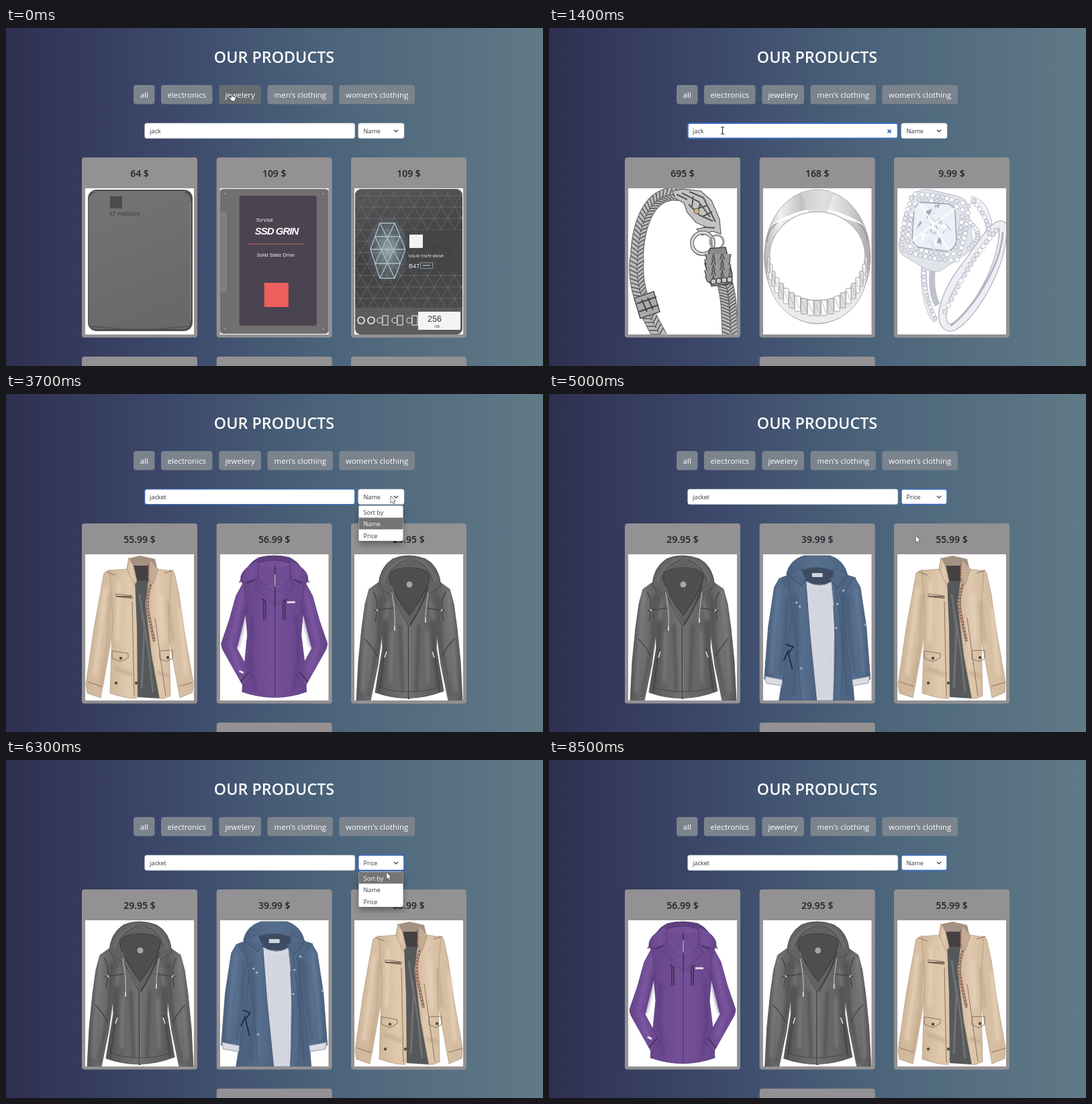
Write an HTML page that moves like this. It is 800 px wide and 504 px high and loops after 8800 ms.

```html
<!DOCTYPE html>
<html lang="en">
<head>
<meta charset="utf-8">
<title>Our products</title>
<style>
html, body { margin: 0; width: 100%; height: 100%; overflow: hidden; }
svg { display: block; width: 800px; height: 504px; font-family: "Open Sans", "Noto Sans", sans-serif; }
</style>
</head>
<body>
<svg id="stage" viewBox="0 0 800 504">
  <defs>
    <linearGradient id="sky"><stop stop-color="#2f3051"/><stop offset=".3" stop-color="#3c486a"/><stop offset=".6" stop-color="#4b647b"/><stop offset="1" stop-color="#607a87"/></linearGradient>
    <linearGradient id="steel" x2=".3" y2="1"><stop stop-color="#747476"/><stop offset="1" stop-color="#69696b"/></linearGradient>
    <linearGradient id="night" x2=".2" y2="1"><stop stop-color="#58585a"/><stop offset=".5" stop-color="#424244"/><stop offset="1" stop-color="#4b4b4d"/></linearGradient>
    <linearGradient id="silver"><stop stop-color="#b5b5b5"/><stop offset=".15" stop-color="#f2f2f2"/><stop offset=".35" stop-color="#c2c2c2"/><stop offset=".55" stop-color="#f6f6f6"/><stop offset=".8" stop-color="#cfcfcf"/><stop offset="1" stop-color="#aaa"/></linearGradient>
    <linearGradient id="cotton"><stop stop-color="#cfb699"/><stop offset=".45" stop-color="#e0c9ae"/><stop offset="1" stop-color="#d3bb9f"/></linearGradient>
    <linearGradient id="violet"><stop stop-color="#674589"/><stop offset=".5" stop-color="#75509a"/><stop offset="1" stop-color="#684689"/></linearGradient>
    <linearGradient id="leather"><stop stop-color="#565658"/><stop offset=".45" stop-color="#727274"/><stop offset="1" stop-color="#5a5a5c"/></linearGradient>
    <linearGradient id="denim"><stop stop-color="#4b6080"/><stop offset=".5" stop-color="#576f8e"/><stop offset="1" stop-color="#4d6382"/></linearGradient>
    <radialGradient id="glow"><stop stop-color="#b9cbd3" stop-opacity=".75"/><stop offset="1" stop-color="#7390a0" stop-opacity="0"/></radialGradient>
    <clipPath id="photo"><rect width="162" height="218"/></clipPath>
    <clipPath id="body"><rect x="1" y="1" width="160" height="217" rx="9"/></clipPath>
    <clipPath id="cardClip"><rect x="514" y="193" width="172" height="268.5" rx="4"/></clipPath>
    <filter id="shadow" x="-40%" y="-40%" width="180%" height="190%"><feDropShadow dx="0" dy="5" stdDeviation="5" flood-opacity=".35"/></filter>
    <filter id="soft" filterUnits="userSpaceOnUse" x="-10" y="-10" width="182" height="238"><feGaussianBlur stdDeviation="2"/></filter>
  </defs>
  <rect width="800" height="504" fill="url(#sky)"/>
  <text x="399.5" y="52" font-size="23.3" font-weight="600" fill="#fff" text-anchor="middle">OUR PRODUCTS</text>
  <g id="buttons"></g>
  <g id="cards"></g>
  <g clip-path="url(#cardClip)"><g id="overlay">
    <path d="M519 70V6q0-6 6-6h150q6 0 6 6v64z" fill="#939193"/>
    <text x="600" y="34" font-size="11.4" font-weight="600" fill="#fff" text-anchor="middle">Mens Cotton Jacket</text>
  </g></g>
  <g id="form"></g>
  <g id="cursor"></g>
</svg>
<script>
const LOOP = 8800, STEP = 100;
const $ = id => document.getElementById(id);
const range = n => [...Array(n).keys()];
const rect = (x, y, w, h, fill, extra = "") => `<rect x="${x}" y="${y}" width="${w}" height="${h}" fill="${fill}" ${extra}/>`;
const path = (d, fill = "none", stroke = "none", width = 1, extra = "") =>
  `<path d="${d}" fill="${fill}" stroke="${stroke}" stroke-width="${width}" ${extra}/>`;
const dot = (x, y, r, fill, extra = "") => `<circle cx="${x}" cy="${y}" r="${r}" fill="${fill}" ${extra}/>`;
const oval = (x, y, rx, ry, fill, extra = "") => `<ellipse cx="${x}" cy="${y}" rx="${rx}" ry="${ry}" fill="${fill}" ${extra}/>`;
const text = (x, y, size, fill, str, extra = "") => `<text x="${x}" y="${y}" font-size="${size}" fill="${fill}" ${extra}>${str}</text>`;
const fold = (d, color, width = 5) => path(d, "none", color, width, 'filter="url(#soft)" opacity=".65"');
const bold = 'font-weight="600"', middle = 'text-anchor="middle"', arial = 'font-family="Liberation Sans, sans-serif"';
const mirrored = (art, axis) => art + `<g transform="translate(${axis * 2}) scale(-1 1)">${art}</g>`;

function random(seed) {
  return () => (seed = (seed * 16807) % 2147483647) / 2147483647;
}

// Rope of chevrons along a cubic curve
function braid(a, b, c, d, width, count) {
  const curve = `M${a}C${b} ${c} ${d}`;
  const at = t => [0, 1].map(i => (1 - t) ** 3 * a[i] + 3 * t * (1 - t) ** 2 * b[i] + 3 * t * t * (1 - t) * c[i] + t ** 3 * d[i]);
  const links = range(count).map(i => {
    const [x, y] = at(i / count), [nx, ny] = at((i + 1) / count);
    const angle = Math.atan2(ny - y, nx - x) * 180 / Math.PI, h = width / 2 - 1;
    return `<path transform="translate(${x.toFixed(1)} ${y.toFixed(1)}) rotate(${angle.toFixed(1)})" d="M-3 ${-h}L3 -1L-3 ${h}M3 -1H6"/>`;
  }).join("");
  return path(curve, "none", "#6e6e6e", width) + path(curve, "none", "#bdbdbd", width - 2.5) +
    `<g fill="none" stroke="#5c5c5c" stroke-width="1.7">${links}</g>`;
}

function gems(count, place, seed) {
  const rnd = random(seed);
  return range(count).map(i => {
    const [x, y, r] = place(i / (count - 1));
    return dot(x.toFixed(1), y.toFixed(1), r, rnd() > .5 ? "#fff" : "#e3e5ec", 'stroke="#a9adba" stroke-width=".8"');
  }).join("");
}

function drive() {
  return rect(4, 2, 156, 211, "#4f4f51", 'rx="13"') + rect(5, 6, 152, 204, "url(#steel)", 'rx="12"') +
    path("M10 5H150M157 20V195", "none", "#8d8d8f", 1) + path("M10 206Q80 214 152 206", "none", "#555557", 2) +
    rect(37, 12, 18, 18, "#4b4b4d") + text(36, 41, 8, "#48484a", "KT Pebblers", bold);
}

function ssd() {
  const screws = [[8, 8], [154, 8], [8, 210], [154, 210]].map(([x, y]) => dot(x, y, 3, "#858385", 'stroke="#5d5b5d"')).join("");
  return rect(0, 1, 162, 216, "#716f71", 'rx="5"') + path("M1 33H9Q12 33 12 37V152Q12 157 8 157H1", "#7f7d7f", "#605e60") + screws +
    rect(29, 11, 115, 194, "#4a4450", 'rx="3"') +
    text(53, 50, 8, "#eee", "TorVisk", `${arial} font-style="italic"`) +
    text(52, 69, 15, "#fff", "SSD GRIN", `${arial} font-weight="700" font-style="italic" letter-spacing="-1"`) +
    path("M42 83H126", "none", "#d9706c", 1.4, 'stroke-dasharray="1.4 1"') +
    text(83, 102, 7.6, "#eee", "Solid State Drive", `${arial} ${middle}`) + rect(66, 141, 36, 36, "#ee5f5d");
}

function meshDrive() {
  const rows = range(12).map(i => `M0 ${i * 17 - 6}H162`).join("");
  const slants = range(26).map(i => `M${i * 20 - 170} -6l118 204M${i * 20 - 170} 198l118 -204`).join("");
  const star = "M38 52H60L76 91L60 134H38L24 91ZM31 72H68M24 91H76M31 112H68M38 52L68 112M60 52L31 112M31 72L60 134M68 72L38 134";
  const icons = range(6).map(i => i % 2 ? rect(31 + i * 11, 190, 8, 14, "none", 'stroke="#ddd" stroke-width="1.2"') : dot(38 + i * 11, 197, 4, "none", 'stroke="#ddd" stroke-width="1.2"')).join("");
  return `<g clip-path="url(#body)">` + rect(0, 0, 162, 218, "url(#night)") + path(rows + slants, "none", "#6f6f71", .8) +
    oval(50, 92, 33, 52, "url(#glow)") + path(star, "none", "#a9c0ca", 1.3) +
    rect(76, 62, 86, 62, "#444446", 'opacity=".75"') + rect(0, 178, 162, 40, "#5c5c5e") + "</g>" +
    rect(82, 69, 20, 20, "#f2f2f2") +
    text(81, 103, 5, "#eee", "SOLID STATE DRIVE", `${bold} letter-spacing=".4"`) + text(81, 119, 9, "#eee", "B47", arial) +
    rect(98.5, 111, 18, 8.5, "none", 'stroke="#8097a1"') + rect(102, 114, 11, 2, "#8097a1") +
    dot(10, 197, 5, "none", 'stroke="#eee" stroke-width="1.7"') + dot(25, 197, 5, "none", 'stroke="#eee" stroke-width="1.7"') + icons +
    rect(95, 184, 63, 27, "#f4f4f4", 'rx="1"') + text(109, 199, 12.5, "#333", "256", arial) + text(119, 208, 5.5, "#444", "GB", arial);
}

function bracelet() {
  const scales = range(15).map(i => {
    const x = 121 + (i % 3) * 13 - (i % 2), y = 98 + Math.floor(i / 3) * 8;
    return path(`M${x - 6} ${y}q1 9 6 11q5 -2 6 -11`, "#999", "#4b4b4b", 1.4);
  }).join("");
  const head = "M66 4L82 1L108 4L124 18L136 46L138 68L125 64L110 70L102 61L116 58L101 51L88 36L83 22L70 15Z";
  return braid([76, 9], [30, 2], [14, 58], [13, 104], 20, 22) + braid([13, 104], [8, 150], [25, 180], [48, 222], 22, 20) +
    path("M9 164L38 154L47 184L18 194Z", "#aaa", "#4d4d4d", 1.5) + path("M13 172L42 162M16 184L45 174M20 166l8 18M29 163l8 18", "none", "#444", 2) +
    path(head, "#c4c4c4", "#666", 1.3) +
    path("M80 7L105 20L122 43M91 5L112 14L130 50M90 24L106 40L126 49M104 30l13-4M111 42l14-7M112 58l17 1M72 9l16 8M97 12l-2 15M107 24l-4 14", "none", "#555", 2) +
    dot(102, 34, 4, "#d7b27c", 'stroke="#555"') +
    dot(111, 82, 16, "none", 'stroke="#777" stroke-width="6"') + dot(111, 82, 16, "none", 'stroke="#ddd" stroke-width="3"') +
    dot(132, 80, 10, "none", 'stroke="#999" stroke-width="3"') +
    braid([143, 138], [151, 164], [150, 188], [152, 222], 24, 17) +
    path("M122 90L145 88L155 128L154 142L124 146L114 112Z", "#8a8a8a", "#4a4a4a", 1.5) + scales +
    range(4).map(i => dot(127 + i * 8, 139 - i, 4, "#c9c9c9", 'stroke="#444" stroke-width="1.5"')).join("");
}

function band() {
  const stones = range(21).map(i => {
    const a = (12 + i * 7.8) * Math.PI / 180, x = 81 + 74 * Math.cos(a), y = 97 + 82 * Math.sin(a);
    const w = 3 + 6 * Math.sin(a), h = 23;
    return rect((x - w / 2).toFixed(1), (y - h / 2).toFixed(1), w.toFixed(1), h, i % 2 ? "#fafafa" : "#dedede", 'rx="1.5" stroke="#9c9c9c" stroke-width=".9"') +
      path(`M${x - w / 3} ${y - 8}L${x + w / 3} ${y + 7}`, "none", "#b4b4b4", .8);
  }).join("");
  return oval(81, 102, 79, 100, "url(#silver)", 'stroke="#a2a2a2"') + path("M6 80C8 18 154 18 156 80", "none", "#9c9c9c", 2) +
    path("M10 56Q82 6 152 56Q82 24 10 56Z", "#fff") + path("M57 5Q81 0 106 6L96 35H68Z", "#d4d4d4", "none", 0, 'opacity=".7"') +
    oval(81, 101, 71, 66, "#fff", 'stroke="#b6b6b6" stroke-width="1.4"') +
    path("M4 106C12 188 150 188 158 106L156 128C142 226 20 226 6 128Z", "#ececec", "#aaa") + stones;
}

function diamond() {
  const rnd = random(77), halo = (t, wide) => {
    const a = t * Math.PI * 2, k = 1 / Math.max(Math.abs(Math.cos(a)), Math.abs(Math.sin(a))) ** .75;
    return [56 + wide * k * Math.cos(a + .2), 58 + wide * k * Math.sin(a + .2), 3.4];
  };
  const facets = range(38).map(() => {
    const x = 30 + rnd() * 48, y = 24 + rnd() * 58;
    return path(`M${x} ${y}l${rnd() * 20 - 10} ${rnd() * 20 - 10}l${rnd() * 14 - 7} ${rnd() * 14}z`, ["#c8cfdf", "#fff", "#e1e6ef", "#9da6b8"][Math.floor(rnd() * 4)]);
  }).join("");
  const hoop = "M157 55C146 48 126 82 101 116C70 155 58 198 75 207C94 217 162 122 157 55Z";
  return path("M109 17C130 20 137 44 137 68", "none", "#b9bcc7", 10) + path("M109 17C130 20 137 44 137 68", "none", "#f3f3f7", 8) +
    path("M40 116C37 155 48 190 58 197M53 116C49 145 54 165 60 174", "none", "#bfc2cd", 9) + path("M40 116C37 155 48 190 58 197", "none", "#f0f0f5", 7) +
    path(hoop, "none", "#9fa3b0", 12) + path(hoop, "none", "#eeeef4", 10) +
    path("M157 65C155 118 107 186 79 205", "none", "#b3b6c2", 3) +
    gems(17, t => [147 - 76 * t, 63 + 121 * t - 10 * Math.sin(t * 3.14), 3.7], 9) +
    gems(14, t => [39 + 17 * t * t, 121 + 73 * t, 3], 12) + gems(9, t => [114 + 23 * Math.sin(t * 1.5), 19 + 48 * t, 3.3], 5) +
    path("M23 9Q33 0 48 2L91 12Q104 17 105 26L112 80Q111 91 101 99L62 124Q48 125 38 118L7 99Q0 90 3 78Z", "#e2e4eb", "#b7bac6") +
    gems(42, t => halo(t, 46), 21) + gems(34, t => halo(t, 38), 31) +
    path("M32 21L75 23Q85 27 86 35L88 79Q85 91 75 94L32 88Q23 84 22 75L25 30Z", "#edf0f6", "#989faf", 1.4) + facets +
    path("M32 21L54 54L86 30M22 78L54 54L77 94", "none", "#fff", 2) + gems(12, t => [105 + 15 * Math.sin(t * 3), 48 + t * 42, 3.4], 43);
}

function beige() {
  const skin = "url(#cotton)", seam = "#b29a80";
  return path("M36 23L28 28L22 61L13 111L1 194L3 207L23 214L38 130L44 80ZM126 23L133 28L140 61L147 111L161 191L160 206L141 214L122 110Z", skin, seam, .8) +
    path("M64 22L36 24L41 92L37 207Q60 215 76 215L96 120L100 40Z", skin, seam, .8) +
    path("M65 6L82 2L104 7L108 24L96 42L74 41Z", "#a39183") + path("M71 17H94V42H74Z", "#454143") +
    path("M74 39L94 40L90 72L99 150L111 215L78 213L77 110Z", "#565959") +
    path("M81 60L88 110L84 200M86 90L95 150L101 206", "none", "#6f7171", 3) +
    path("M108 22L129 25L124 95L127 211Q118 216 111 215L99 150L90 73L96 45Z", skin, seam, .8) +
    path("M98 43Q90 66 94 87T103 130", "none", "#8f6a60", 4) + path("M98 43Q90 66 94 87T103 130", "none", "#d8b6a9", 2, 'stroke-dasharray="2 3"') +
    path("M65 5L62 22L73 46L77 40L72 18Z", skin, seam) + path("M97 9L109 23L101 45L94 34Z", "#c4ad94", seam) +
    path("M94 15L95 36", "none", "#a95754", 2, 'stroke-dasharray="2 2"') +
    fold("M30 50L24 105L14 180M50 40L48 130M112 60L116 130M141 80L150 180", "#ead7c0", 6) + fold("M37 60L34 130L23 200M44 170L72 180M124 70L130 130M107 176L125 182", "#b59c80", 4) +
    path("M45 62l25 3M46 59l24 3v4l-24-3zM40 144l24 4v6l-11 6l-13-5zM111 144l19 -1v12l-8 5l-11-4zM31 26l14 5M118 28l14-4M3 190l21 7M140 197l20-6M70 70L73 212M104 95L120 211", "none", "#88725c", 1) +
    path("M47 63H69", "none", "#5c554e", 1.6) + [[53, 155], [123, 154], [46, 192], [76, 192]].map(([x, y]) => dot(x, y, 2.2, "#544a42")).join("");
}

function purple() {
  const skin = "url(#violet)", seam = "#553876";
  const side = path("M36 40L24 62L14 98L2 133Q2 140 8 149L35 197L47 182Q36 160 25 140L34 104L40 80Z", skin, seam, .8) +
    path("M55 36L33 43Q27 33 38 22L53 10L63 14Z", skin, seam, .8) +
    path("M31 190L43 176M62 66L68 70V97M65 68V98", "none", "#43314f", 1.7) + path("M33 37l-4 5M40 43l12-5", "none", "#44305a", 1.6) +
    fold("M34 55L25 98L14 134L31 175", "#8661a8", 4) + fold("M39 78L32 112L25 139M48 92L45 150L52 202", "#55377a", 4);
  return path("M38 38Q36 16 58 5Q81 -1 104 5Q126 16 124 38L108 48H54Z", "#5f3f80", seam) +
    path("M36 41L56 33H106L126 41L124 85L121 120L126 160L129 205Q82 222 33 205L37 160L41 120L38 85Z", skin, seam, .8) + mirrored(side, 81) +
    path("M58 13Q81 5 104 13L105 44L82 62L58 45Z", "#76519a", seam) + range(9).map(i => path(`M60 ${18 + i * 3}q21 7 44 0`, "none", "#604080", .8)).join("") +
    path("M57 36L82 58L106 36L112 49L82 77L52 49Z", skin, seam, .8) + path("M82 18V78", "none", "#49395a", 2.2) +
    path("M82 30V48", "none", "#ccc", 1.2) + path("M82 76V212", "none", seam, 1.3) + rect(100, 70, 12, 3, "#ded5e6") + path("M29 174l6 3", "none", "#eee", 3);
}

function dark() {
  const skin = "url(#leather)", seam = "#4c4c4e";
  const side = path("M36 42L22 52L16 74L11 110L6 160L3 218H24L35 165L41 120L48 72Z", skin, seam, .8) +
    fold("M24 56L18 110L12 205M50 70L46 98M56 115L54 190", "#88888a", 4) + fold("M39 62L36 130L27 175L21 214M48 100L44 150L38 200M68 105L72 205", "#434345", 4) +
    path("M15 126Q25 136 34 152M28 56Q38 70 31 100M44 152L37 206M29 84L59 80M48 141L42 160", "none", "#444446", 1.4) +
    path("M33 82l2 3M48 145l-3 9", "none", "#ddd", 1.6);
  return path("M35 44L56 38H110L129 44L123 110L122 140L128 175L133 204Q81 224 31 206L36 175L42 140L41 110Z", skin, seam, .8) + mirrored(side, 82) +
    path("M36 47Q37 20 57 7Q80 -3 106 7Q126 17 129 47L107 62L83 106L58 65Z", "#626264", seam) +
    path("M52 30Q60 20 82 20Q104 20 112 30Q114 48 82 91Q50 48 52 30Z", "#4e4e50", "#3c3c3e", 1.2) +
    fold("M44 42Q47 18 76 8M121 42Q116 18 92 8", "#7d7d7f", 4) + path("M48 40Q53 17 78 9M117 40Q111 17 90 9", "none", "#505052", 1.4) +
    dot(82, 45, 4.5, "#a5a5a7") + path("M55 47Q65 79 81 106V216M110 48Q99 82 82 107", "none", "#434345", 2.4) +
    path("M55 47Q65 79 82 106V214", "none", "#98989a", .9) + path("M56 57Q62 90 60 114M110 57Q105 90 106 101", "none", "#aaaaad", 1.5) +
    path("M36 198Q80 212 128 198", "none", "#49494b", 1.2) + rect(59, 107, 2, 7, "#ccc") + rect(105, 95, 2, 7, "#ccc");
}

function blue() {
  const skin = "url(#denim)", seam = "#40546f";
  const side = path("M25 35L17 49L8 108L2 186L29 193L38 131L46 62Z", skin, seam, .8) + path("M3 182L29 187L28 196L5 192Z", "#d9dce4", "#8f99aa") +
    fold("M24 50L17 110L12 178", "#6c84a2", 4) + fold("M36 62L33 122L25 178", "#3f536f", 4);
  return path("M27 35L49 27H113L138 35L128 120L136 218H24L40 120Z", skin, seam, .8) + mirrored(side, 81) +
    path("M35 30Q39 9 61 2H100Q121 9 126 31L112 43H52Z", skin, seam, .8) + path("M57 24Q81 15 105 25L103 44H62Z", "#3d4c61", seam) +
    path("M64 40Q84 52 102 41L107 92L105 218H76L70 125Z", "#d7d8e2", "#9099aa") + range(9).map(i => path(`M${72 + i * 3.5} 50l${i / 3} 164`, "none", "#c4c9d6", .7)).join("") +
    path("M36 29L57 21L64 41L70 118L80 218H57L50 130Z", skin, seam, .8) + path("M105 21L126 30L105 78L109 150L105 218H116L120 140Z", "#536b88", seam, .8) +
    path("M36 30L57 47L65 35M126 31L111 51L99 36", skin, seam, 1.2) + rect(73, 28, 16, 6, "#cfd4dc", 'rx="1"') +
    fold("M47 60L52 130L45 210M120 60L119 130L125 210", "#3f536f", 4) +
    path("M34 134l11 4l-7 10l6 24M38 143l-7 15", "none", "#252f3f", 2) + [[50, 72], [55, 78], [57, 170], [111, 74], [109, 110], [120, 54], [153, 105]].map(([x, y]) => dot(x, y, 1.8, "#a5b2c3")).join("");
}

const art = { drive, ssd, meshDrive, bracelet, band, diamond, beige, purple, dark, blue };
const shelves = [
  [0, [["64", "drive"], ["109", "ssd"], ["109", "meshDrive"]]],
  [300, [["695", "bracelet"], ["168", "band"], ["9.99", "diamond"]]],
  [2000, [["55.99", "beige"], ["56.99", "purple"], ["29.95", "dark"]]],
  [5000, [["29.95", "dark"], ["39.99", "blue"], ["55.99", "beige"]]],
  [7000, [["56.99", "purple"], ["29.95", "dark"], ["55.99", "beige"]]]
];
const columns = [113, 313.7, 514];
const cursorTrack = [[0, 337, 103], [200, 337, 103], [900, 258.5, 153], [2500, 258.5, 153], [2700, 272, 176], [2800, 272, 176],
  [3600, 573, 152], [3900, 573, 152], [4700, 546, 211], [5200, 546, 211], [5500, 559, 172], [5900, 575, 154], [6100, 575, 154],
  [6700, 550, 194], [7000, 550, 195], [7100, 552, 197], [7400, 556, 150], [7800, 560, 45]];
const overlayTrack = [[0, 461], [5000, 461], [5300, 397], [5400, 399], [5500, 413], [5800, 461], [7000, 461], [7100, 422], [7200, 406], [7300, 422], [7600, 461]];
const labels = [["all", 190, 31.5], ["electronics", 231, 76.5], ["jewelery", 317.3, 62.7], ["men's clothing", 389.5, 97.5], ["women's clothing", 496.3, 112.7]];

function follow(track, t) {
  const i = track.findIndex(key => key[0] > t);
  if (i < 0) return track[track.length - 1].slice(1);
  const [t0, ...from] = track[i - 1], [t1, ...to] = track[i], k = (t - t0) / (t1 - t0);
  return from.map((v, n) => v + (to[n] - v) * k);
}

function drawCards(items, fullRow) {
  return columns.map((x, i) => {
    const [price, name] = items[i];
    return rect(x, 193, 172, 268.5, "#939193", 'rx="4"') +
      text(x + 86, 222, 14, "#1f2326", `${price} $`, `${bold} ${middle}`) +
      `<g transform="translate(${x + 5} 239)" clip-path="url(#photo)">${rect(0, 0, 162, 218, "#fff")}${art[name]()}</g>` +
      (fullRow || i === 1 ? rect(x, 490, 172, 20, "#939193", 'rx="4"') : "");
  }).join("");
}

const inside = (x, y, left, top, w, h) => x >= left && x <= left + w && y >= top && y <= top + h;

function drawButtons(x, y) {
  return labels.map(([label, left, w]) => {
    const hover = inside(x, y, left, 85, w, 28.5);
    return rect(left, 85, w, 28.5, hover ? "#656c72" : "#7b838d", 'rx="4"') +
      text(left + w / 2, 104, 11.5, "#fff", label, `${middle} font-weight="500"`);
  }).join("");
}

function drawForm(t, y) {
  const focused = t >= 900 && t < 3700, fading = t === 3700, selected = t >= 3800;
  const ring = (on, width) => on ? `stroke="#3a6cc0" stroke-width="${width}"` : 'stroke="#d5d9df" stroke-width=".6"';
  const value = t >= 5000 && t < 7000 ? "Price" : "Name";
  const caret = t >= 2000 && t < 2400 || t >= 2700 && t < 3200;
  const open = t >= 3700 && t < 5000 || t >= 6200 && t < 7000;
  let out = rect(206.7, 142, 313, 22.6, "#fff", `rx="3" ${ring(focused || fading, focused ? 2 : 1.1)}`) +
    text(214, 157, 9.2, "#33383d", t < 2000 ? "jack" : "jacket") +
    (caret ? path("M239 148V159", "none", "#222", .8) : "") +
    (focused ? path("M504.5 151.5l5 5m0-5l-5 5", "none", "#2a5cab", 1.6) : "") +
    rect(524.8, 142, 68.2, 22.6, "#fff", `rx="3" ${ring(selected, 1.6)}`) + text(532.5, 157, 9.1, "#33383d", value) +
    path("M578 152l3 3l3-3", "none", "#343a40", 1.2);
  if (open) {
    const options = ["Sort by", "Name", "Price"];
    const active = y > 167 ? Math.min(2, Math.floor((y - 167) / 17.4)) : options.indexOf(value);
    out += rect(525.5, 166.5, 66, 52.5, "#fff", 'rx="2" filter="url(#shadow)"') + rect(525.5, 167 + active * 17.4, 66, 17.4, "#767576") +
      options.map((o, i) => text(532.5, 179.5 + i * 17.6, 9.1, i === active ? "#fff" : "#33383d", o)).join("");
  }
  return out;
}

function drawCursor(x, y) {
  let shape = path("M0 0V10.5L2.5 8.4L4.2 12L6 11.2L4.4 7.7H7.4Z", "#fff", "#3c3e42", .7);
  if (inside(x, y, 207, 142, 312, 22)) shape = path("M-2.5 -5H2.5M0 -5V5M-2.5 5H2.5", "none", "#222", 1.1);
  else if (labels.some(([, left, w]) => inside(x, y, left, 85, w, 28.5)))
    shape = path("M-1.5 -5q1.2-1.5 2 0v4l4 1q1 .5 .7 2l-1 4h-5l-3.5-5q0-1.6 1.5-1l1.3 1z", "#fff", "#26282c", .8);
  return `<g transform="translate(${x} ${y})">${shape}</g>`;
}

let shown = -1;
function render(time) {
  const t = Math.floor(time % LOOP / STEP) * STEP;
  const shelf = shelves.filter(s => s[0] <= t).length - 1;
  if (shelf !== shown) $("cards").innerHTML = drawCards(shelves[shelf][1], shelf === 0);
  shown = shelf;
  const [x, y] = follow(cursorTrack, t);
  $("buttons").innerHTML = drawButtons(x, y);
  $("form").innerHTML = drawForm(t, y);
  $("overlay").setAttribute("transform", `translate(0 ${follow(overlayTrack, t)[0]})`);
  $("cursor").innerHTML = t < 7900 ? drawCursor(x, y) : "";
}

const start = performance.now();
function tick() {
  render(performance.now() - start);
  requestAnimationFrame(tick);
}
tick();
</script>
</body>
</html>
```
